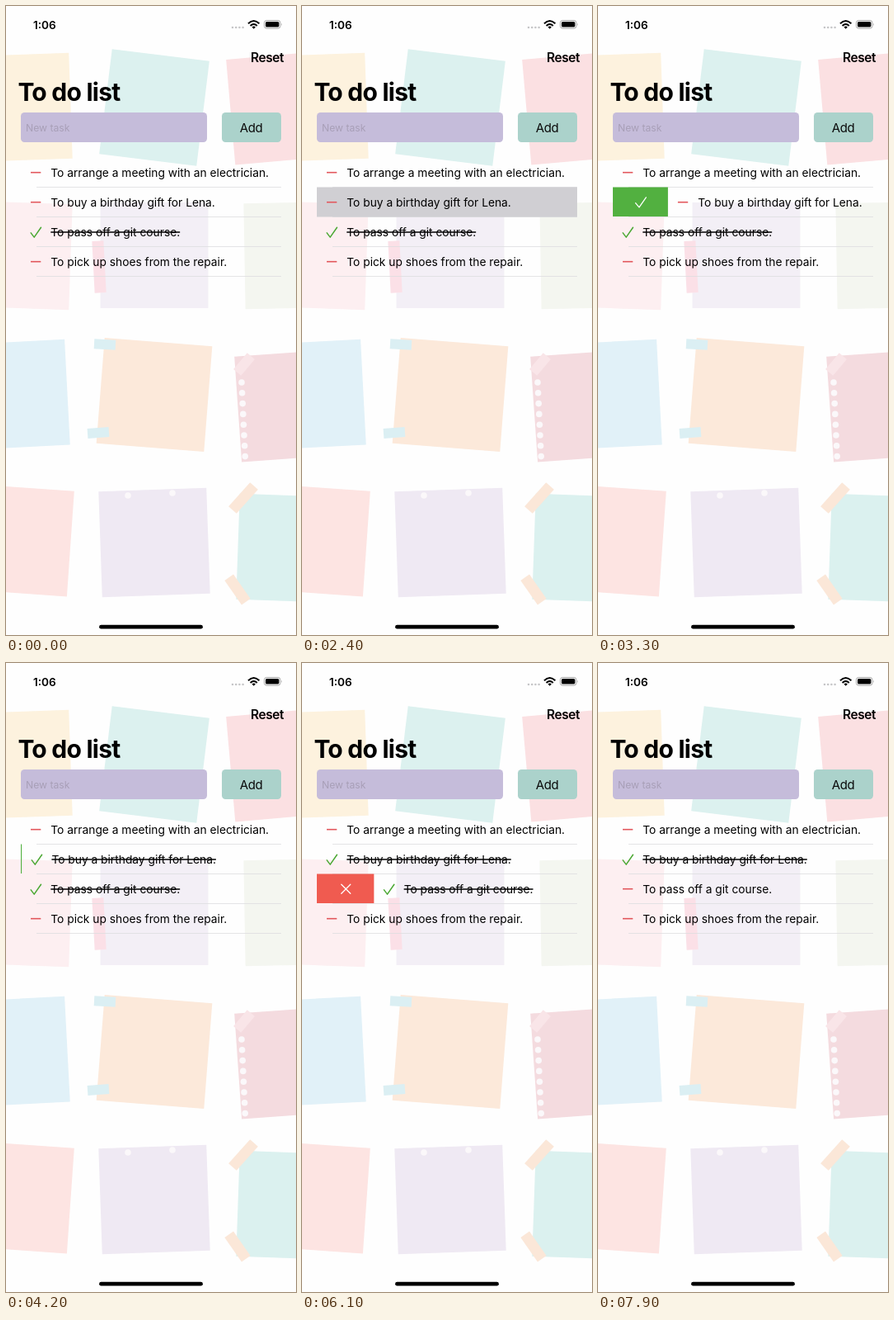
These frames come from a looping animation (352 by 762 pixels, 8000 ms). An HTML page:

```html
<!DOCTYPE html>
<html lang="en">
<head>
<meta charset="utf-8">
<title>To do list</title>
<style>
  html, body { margin: 0; width: 100%; height: 100%; overflow: hidden; background: #fefefe; }
  svg { display: block; width: 100%; height: 100%; }
  text { font-family: Inter, "Liberation Sans", sans-serif; font-optical-sizing: none; white-space: pre; }
  .row { font-size: 13.77px; }
  .thin { fill: none; stroke-linecap: round; stroke-linejoin: round; }
</style>
</head>
<body>
<svg viewBox="0 0 352 762" xmlns="http://www.w3.org/2000/svg">
  <g id="notes"></g>

  <text x="32.9" y="27.5" font-size="13.6" font-weight="600">1:06</text>
  <path d="M275 26h13" stroke="#c6c6c8" stroke-width="2.6" stroke-linecap="round" stroke-dasharray="0 4.2"/>
  <g fill="none" stroke="#000" stroke-width="2">
    <path d="M294 21.2Q300.7 14.8 307.4 21.2"/>
    <path d="M296.6 23.9Q300.7 20.1 304.8 23.9"/>
  </g>
  <path d="M298.5 25.5Q300.7 23.7 302.9 25.5L300.7 27.7Z"/>
  <rect x="313.5" y="17.5" width="19.4" height="9.6" rx="2.7" fill="none" stroke="#a6a6a6"/>
  <rect x="315" y="19" width="16.4" height="6.6" rx="1.5"/>
  <path d="M334 20.7q1.5 1.6 0 3.2z" fill="#a6a6a6"/>

  <text x="296.9" y="67.7" font-size="15.5" font-weight="600" letter-spacing="-.42">Reset</text>
  <text x="14.4" y="115" font-size="30" font-weight="700" letter-spacing="-.75">To do list</text>
  <rect x="18" y="129" width="226" height="36" rx="4.5" fill="#c5bcda"/>
  <text x="24" y="151.7" font-size="12.2" fill="#a89fb7">New task</text>
  <rect x="262" y="129" width="72" height="36" rx="4.5" fill="#abd2cb"/>
  <text x="297.6" y="152.6" font-size="15" letter-spacing="-.3" text-anchor="middle" fill="#0b0b0b">Add</text>

  <g id="list"></g>
  <rect x="113.1" y="749.8" width="125.8" height="4.7" rx="2.35"/>
</svg>

<script>
const LOOP = 8000, STEP = 100;
const ROW_H = 36, TOP = 183.5, LEFT = 18, RIGHT = 334, TEXT_X = 54.3, OPEN = 69.4;

function set(el, attrs) {
  for (const key in attrs) el.setAttribute(key, attrs[key]);
}
function add(parent, tag, attrs, text) {
  const el = document.createElementNS('http://www.w3.org/2000/svg', tag);
  set(el, attrs);
  if (text) el.textContent = text;
  return parent.appendChild(el);
}
const show = (el, on) => el.setAttribute('visibility', on ? 'visible' : 'hidden');

// Backdrop: paper notes on a loose 3 by 4 grid, each tilted by hand
const wall = document.getElementById('notes');
function sheet(fill, cx, cy, angle, width, height) {
  add(wall, 'rect', { x: -width / 2, y: -height / 2, width, height, fill,
    transform: `translate(${cx} ${cy}) rotate(${angle})` });
}
const rowY = [123, 302, 471, 650];
const papers = [
  { fill: '#fdf2de', tilt: -2 }, { fill: '#dcf1ef', tilt: 7, w: 119 }, { fill: '#fbe0e2', tilt: -5, dx: -9 },
  { fill: '#fdeff1', tilt: 2 }, { fill: '#f3eff6', tilt: 0 }, { fill: '#f4f6f0', tilt: -1, dx: 8 },
  { fill: '#e1f1f8', tilt: -3, dx: -4 }, { fill: '#fce9da', tilt: 4.5 }, { fill: '#f4dbdf', tilt: -4, dy: 13 },
  { fill: '#fde4e2', tilt: 4, dy: -3 }, { fill: '#efe9f3', tilt: -2 }, { fill: '#dbf1ef', tilt: 2, dy: 7 }
];
papers.forEach(({ fill, tilt, dx = 0, dy = 0, w = 131 }, i) =>
  sheet(fill, 13 + 167 * (i % 3) + dx, rowY[Math.floor(i / 3)] + dy, tilt, w, 128));

sheet('#fbe0e7', 113, 316, -3, 14, 63);
sheet('#dbeff3', 120, 410, 3, 26, 12);
sheet('#dbeff3', 112, 517, -4, 26, 12);
sheet('#f9e5e8', 289, 434, -50, 26, 12);
sheet('#fbe7d8', 288, 596, -48, 39, 13);
sheet('#fbe7d8', 281, 707, 55, 36, 13);

const hole = (cx, cy) => add(wall, 'circle', { cx, cy, r: 3.8, fill: '#fbf8fa' });
for (let i = 0; i < 8; i++) hole(286 + i * .6, 456 + i * 12.8);
hole(148, 593);
hole(202, 590);

// Rows: done(t) gives the state, shift(t) the swipe distance
const easeOut = p => 1 - (1 - Math.max(0, Math.min(1, p))) ** 3;
const swipe = (open, openMs, close) => t =>
  OPEN * (easeOut((t - open) / openMs) - easeOut((t - close) / 400));
const finish = { fill: '#52b040', sign: (x, y) => `M${x - 6.5} ${y + 1}l4.4 5.2l8.4 -12` };
const undo = { fill: '#f05b50', sign: (x, y) => `M${x - 5.5} ${y - 5.5}l11 11m0 -11l-11 11` };
const idle = { done: () => false, shift: () => 0, pressed: () => false, action: finish };

const tasks = [
  { label: 'To arrange a meeting with an electrician.' },
  { label: 'To buy a birthday gift for Lena.', done: t => t >= 3900,
    shift: swipe(2630, 1000, 3900), pressed: t => t >= 2200 && t < 2600 },
  { label: 'To pass off a git course.', done: t => t < 6600,
    shift: swipe(5550, 600, 6600), action: undo },
  { label: 'To pick up shoes from the repair.' }
].map(task => ({ ...idle, ...task }));

const list = document.getElementById('list');
tasks.forEach((_, i) => add(list, 'path', {
  d: `M37 ${TOP + ROW_H * (i + 1)}H${RIGHT}`, stroke: '#dedde0', 'stroke-width': .8
}));

function makeRow(task, i) {
  const y = TOP + ROW_H * i, mid = y + 18.2;
  const press = add(list, 'rect', { x: LEFT, y, width: RIGHT - LEFT, height: ROW_H, fill: '#d0cfd3' });
  const button = add(list, 'rect', { x: LEFT, y, height: ROW_H - .5, fill: task.action.fill });
  const sign = add(list, 'path', { class: 'thin', stroke: '#fff', 'stroke-width': 1.3 });
  const cell = add(list, 'g', {});
  const dash = add(cell, 'path', { d: `M30 ${mid}h12.3`, stroke: '#e2575c', 'stroke-width': 1.6 });
  const check = add(cell, 'path', { class: 'thin', d: `M30.2 ${mid + 1.2}l4 5.2l8.3 -11.8`,
    stroke: '#4aa832', 'stroke-width': 1.5 });
  const text = add(cell, 'text', { class: 'row', x: TEXT_X, y: mid + 4.9 }, task.label);
  const strike = add(cell, 'path', { d: `M${TEXT_X} ${mid + .3}h${text.getComputedTextLength()}`,
    stroke: '#000', 'stroke-width': 1.4 });

  return t => {
    const done = task.done(t), dx = task.shift(t);
    show(press, task.pressed(t));
    show(button, dx > .2);
    show(sign, dx > 16);
    set(button, { width: Math.max(0, dx) });
    set(sign, { d: task.action.sign(LEFT + dx / 2 + .6, mid) });
    set(cell, { transform: `translate(${dx} 0)` });
    show(dash, !done);
    show(check, done);
    show(strike, done);
  };
}
const drawRows = tasks.map(makeRow);

function draw(now) {
  const t = Math.floor((now % LOOP) / STEP) * STEP;
  drawRows.forEach(drawRow => drawRow(t));
}

let start;
function frame(now) {
  start ??= now;
  draw(now - start);
  requestAnimationFrame(frame);
}
draw(0);
requestAnimationFrame(frame);
</script>
</body>
</html>
```
